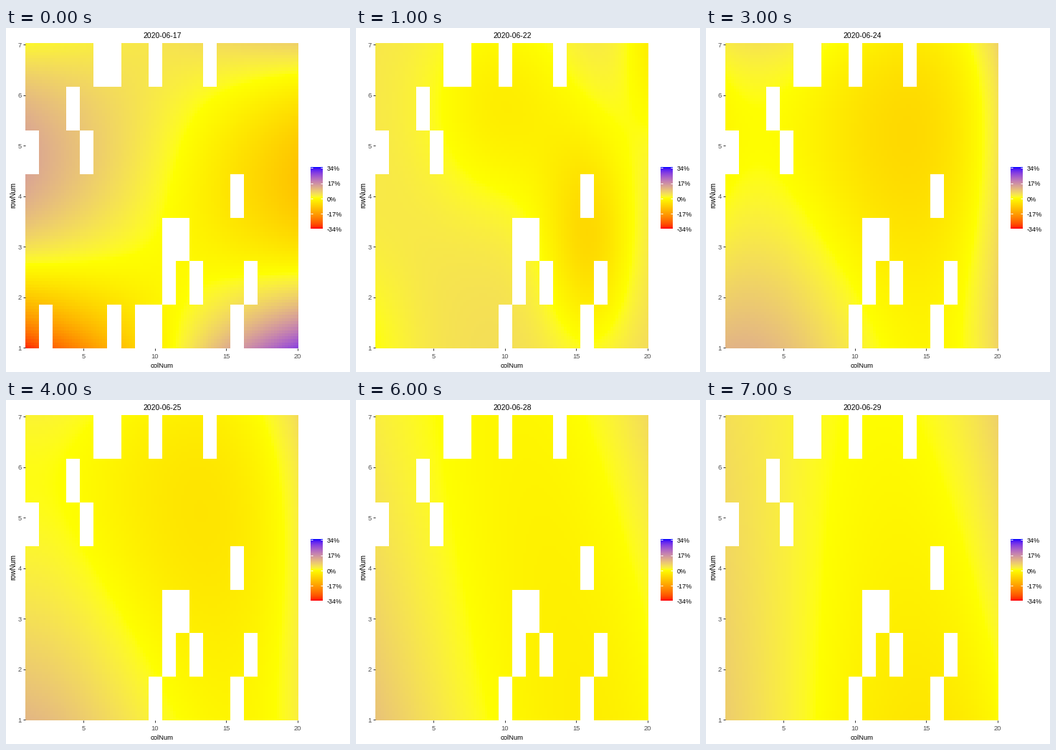
A matplotlib script for the animation above (8 s loop, 480 by 480 pixels).

```python
import numpy as np
import matplotlib.pyplot as plt
from matplotlib.animation import FuncAnimation

plt.rcParams["font.family"] = "Liberation Sans"

SIZE = 480
LEFT, RIGHT, TOP, BOTTOM = 27, 408, 21, 447
COLS, ROWS = 20, 7
CELLS = 100                # raster cells along each side of the panel
LIMIT = 34                 # percent at both ends of the colour scale


# Trend surfaces in percent; x and y run from -1 to 1, right and up.

def bump(x, y, cx, cy, width, height):
    return np.exp(-((x - cx) / width) ** 2 - ((y - cy) / height) ** 2)


def twisted(x, y):
    return 0.6 + 3.3 * y + x * (-11.3 - 9.6 * y + 28 * y**2 - 4.2 * y**3)


def hollows(x, y):
    return (5 + 1.2 * x
            - 12 * bump(x, y, 0.57, -0.3, 0.36, 0.75)
            - 8 * bump(x, y, -0.05, 0.6, 0.6, 0.75)
            - 10 * bump(x, y, 1.1, 1.1, 0.3, 0.8)
            - 4 * bump(x, y, -1.1, -1.1, 0.4, 0.7))


def deep_saddle(x, y):
    d = y - 0.15
    wave = 27 * x**3 + 7.7 * x**2 - 20 * x - 8.9
    return wave + (11 - 3.5 * x) * d**2 + 3 * d**3 - 1.5 * x * y


def soft_saddle(x, y):
    d = y - 0.4
    wave = 10.6 * x**3 + 6.7 * x**2 - 7.9 * x - 5.5
    return wave + (7.9 - 2.5 * x) * d**2 + 3 * d**3


def valley(x, y):
    s = x - 0.3 + 0.3 * y
    return 5 * s**2 + 0.6 * s**3 + 1.2 * x * y + 0.8 * (y**2 - y) - 2.8


def trough(x, y):
    wave = 3 * x**3 + 6 * x**2 - 4.5 * x - 1.6
    return wave + y * (1.3 + 2.6 * x)


def between(first, second):
    return lambda x, y: (first(x, y) + second(x, y)) / 2


SURFACES = {
    17: twisted, 22: hollows, 23: deep_saddle, 24: soft_saddle,
    25: between(soft_saddle, valley), 27: valley,
    28: between(valley, trough), 29: trough,
}
DAYS = list(SURFACES)

# Empty columns in each row, from the top.
GAPS = [(5, 6, 9, 13), (3,), (0, 4), (15,), (10, 11), (10, 12, 16), (9, 15)]
FIRST_DAY_GAPS = (1, 6, 8)

# Colours blend in Lab space: red, yellow in the middle, blue.
TO_XYZ = np.array([[0.4124, 0.3576, 0.1805],
                   [0.2126, 0.7152, 0.0722],
                   [0.0193, 0.1192, 0.9505]])
WHITE = TO_XYZ.sum(axis=1)


def rgb_to_lab(*rgb):
    """Lab of a colour whose channels are all 0 or 1."""
    ratio = TO_XYZ @ rgb / WHITE
    x, y, z = np.where(ratio > 0.008856, np.cbrt(ratio),
                       7.787 * ratio + 16 / 116)
    return np.array([116 * y - 16, 500 * (x - y), 200 * (y - z)])


def lab_to_rgb(lab):
    y = (lab[..., 0] + 16) / 116
    f = np.stack([y + lab[..., 1] / 500, y, y - lab[..., 2] / 200], axis=-1)
    xyz = np.where(f > 6 / 29, f**3, (f - 16 / 116) / 7.787) * WHITE
    linear = np.clip(xyz @ np.linalg.inv(TO_XYZ).T, 0, 1)
    return np.where(linear > 0.0031308,
                    1.055 * linear ** (1 / 2.4) - 0.055, 12.92 * linear)


RED, YELLOW, BLUE = rgb_to_lab(1, 0, 0), rgb_to_lab(1, 1, 0), rgb_to_lab(0, 0, 1)


def colours(percent):
    t = np.clip(percent / LIMIT, -1, 1)[..., None]
    end = np.where(t < 0, RED, BLUE)
    return lab_to_rgb(YELLOW + np.abs(t) * (end - YELLOW))


def cell_index(pixels, cells):
    """Which cell each pixel along one side falls in."""
    return ((np.arange(pixels) + 1 / 3) / pixels * cells).astype(int)


WIDTH, HEIGHT = RIGHT - LEFT, BOTTOM - TOP
CENTRES = (np.arange(CELLS) + 0.5) / CELLS * 2 - 1
X, Y = np.meshgrid(CENTRES, -CENTRES)
RASTER = np.ix_(cell_index(HEIGHT, CELLS), cell_index(WIDTH, CELLS))
BLOCKS = np.ix_(cell_index(HEIGHT, ROWS), cell_index(WIDTH, COLS))


def heatmap(index):
    image = colours(SURFACES[DAYS[index]](X, Y))[RASTER]
    empty = np.zeros((ROWS, COLS), bool)
    for row, cols in enumerate(GAPS):
        empty[row, list(cols)] = True
    if index == 0:
        empty[-1, list(FIRST_DAY_GAPS)] = True
    image[empty[BLOCKS]] = 1
    return image


def date(index):
    return f"2020-06-{DAYS[index]}"


fig = plt.figure(figsize=(4.8, 4.8), dpi=100, facecolor="white")
ax = fig.add_axes([0, 0, 1, 1])


def label(x, y, text, px, color="black", ha="center", **kwargs):
    return ax.text(x, y, text, fontsize=px * 0.72, color=color, ha=ha,
                   va="baseline", **kwargs)


def line(xs, ys, color):
    ax.plot(xs, ys, color=color, lw=0.72, solid_capstyle="butt", zorder=3)


def raster(image, box):
    return ax.imshow(image, extent=box, interpolation="nearest", aspect="auto")


panel = raster(heatmap(0), (LEFT, RIGHT, BOTTOM, TOP))
title = label(217.7, 14, date(0), 10.4)
label(218, 474, "colNum", 9.5)
label(13.5, 233, "rowNum", 9.8, rotation=90, rotation_mode="anchor")

for col in range(5, COLS + 1, 5):
    x = 28 + (col - 1) * 19.95
    line([x, x], [BOTTOM, BOTTOM + 3], "#333333")
    label(x, 461, str(col), 9.4, "#4d4d4d")
for row in range(1, ROWS + 1):
    y = 446 - (row - 1) * 70.5
    line([LEFT - 3, LEFT], [y, y], "#333333")
    label(22, y + 3.7, str(row), 9.4, "#4d4d4d", ha="right")

# Colour scale
scale = np.linspace(LIMIT, -LIMIT, 86)[:, None]
raster(colours(scale), (425, 442, 280, 194))
for i in range(5):
    y = 195.3 + i * 21.2
    for x in (425, 438.6):
        line([x, x + 3.4], [y, y], "white")
    label(448, y + 3.8, f"{LIMIT - i * LIMIT // 2}%", 9.1, ha="left")

ax.set_xlim(0, SIZE)
ax.set_ylim(SIZE, 0)
ax.set_axis_off()


def update(index):
    panel.set_data(heatmap(index))
    title.set_text(date(index))
    return panel, title


anim = FuncAnimation(fig, update, frames=len(DAYS), interval=1000,
                     repeat=True, repeat_delay=0)
plt.show()
```
